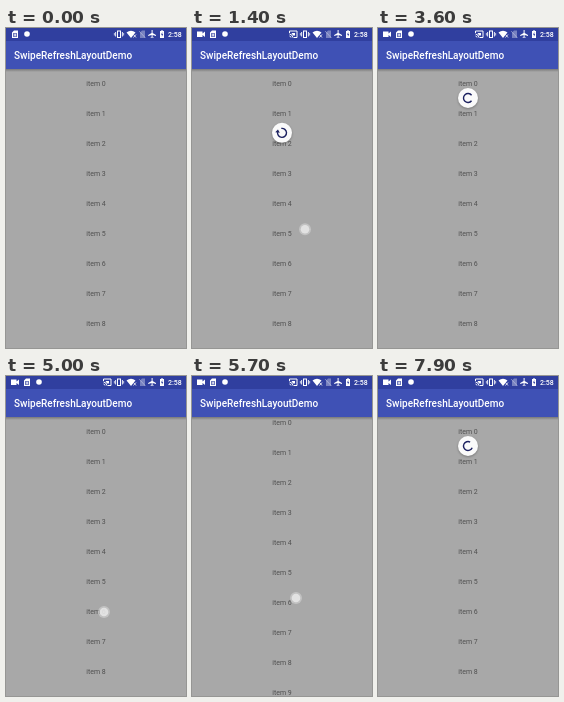
An HTML page that plays this animation: 180 px wide and 320 px high, repeating every 8 s.

```html
<!DOCTYPE html>
<html lang="en">
<head>
<meta charset="utf-8">
<title>Pull to refresh</title>
<style>
  html, body { margin: 0; width: 100%; height: 100%; overflow: hidden; background: #a8a8a8; }
  svg { display: block; width: 180px; height: 320px; }
  text { font-family: Roboto, Inter, sans-serif; }
  #list text { font-size: 7px; fill: #505050; text-anchor: middle; }
  #disc { filter: drop-shadow(0 1px 1px rgba(0, 0, 0, .28)); }
</style>
</head>
<body>
<svg viewBox="0 0 180 320">
  <defs>
    <linearGradient id="shade" x2="0" y2="1">
      <stop stop-opacity=".28"/>
      <stop offset="1" stop-opacity="0"/>
    </linearGradient>
  </defs>
  <rect width="180" height="320" fill="#a8a8a8"/>
  <g id="list"></g>
  <g id="spinner">
    <circle id="disc" r="10" fill="#fafafa"/>
    <path id="arc" fill="none" stroke-width="1.4"/>
    <path id="arrow" d="M-2.3 -.3H2.3L0 2.7Z"/>
  </g>
  <rect y="41" width="180" height="3" fill="url(#shade)"/>
  <rect y="13" width="180" height="28" fill="#3f51b5"/>
  <rect width="180" height="13" fill="#303f9f"/>
  <text x="8" y="30.5" font-size="10" font-weight="500" fill="#fff">SwipeRefreshLayoutDemo</text>

  <g fill="#fff">
    <g id="recording">
      <path d="M5 3.5h5.5v2l2.5-2v5.5l-2.500-2v2H5z"/>
      <path d="M97.500 5V3H105v6.500h-3.500M97.500 6q3 .3 3.300 3.500M97.500 8q1.300 .2 1.500 1.500" fill="none" stroke="#fff"/>
      <path d="M99.500 5h3.500v2.500h-2z"/>
    </g>
    <g id="notices">
      <path fill-rule="evenodd" d="M18 4.500l2-2h4v7.500h-6zM19.300 5v4h3.400v-4z"/>
      <rect x="20.300" y="5.500" width="1.500" height="3"/>
      <circle cx="33" cy="6" r="2.800"/>
    </g>
    <path fill-rule="evenodd" d="M111 2.500h4v7.500h-4zM112 3.500v5.500h2v-5.500zM109.200 4h.9v4.500h-.9zM115.900 4h.9v4.500h-.9zM107.900 5h.7v2.500h-.7zM117.400 5h.7v2.500h-.7z"/>
    <path d="M120.500 4.500q4.500-3.500 9 0l-4.500 5.500z"/>
    <path d="M127.500 6.500l2.500 3M130 6.500l-2.500 3" stroke="#fff" stroke-width=".8"/>
    <path d="M134 4.500l2-2h3v7.500h-5z" opacity=".35"/>
    <path d="M133 3l6.500 7" stroke="#fff" stroke-width=".7" opacity=".5"/>
    <path d="M145.600 2h1v3l3.400 2v1l-3.400-1v1.700l1 .8v.5l-1.500-.4-1.500.4v-.5l1-.8V7l-3.400 1V7l3.400-2z"/>
    <path d="M154 3h1.200v-.800h1.600V3h1.200v7h-4z"/>
    <path d="M156.300 4l-1.300 2.800h.9v2l1.300-2.800h-.9z" fill="#303f9f"/>
    <text x="162" y="9" font-size="7" font-weight="500">2:58</text>
  </g>

  <g id="touch">
    <circle r="6" fill="#d4d4d4" opacity=".6"/>
    <circle r="4.300" fill="#f0f0f0" opacity=".7"/>
  </g>
</svg>
<script>
const $ = id => document.getElementById(id);
const LOOP = 8000, REST = 40, HIDDEN_Y = 30, SWEEP = 288, CYCLE = 1332;
const NAVY = "#1c2160", GREY = "#6b6b6b";

// Finger tracks: time, x, y, opacity
const drags = [
  { release: 2110, end: 4100, origin: 110, from: 400, track: [
    [330, 124, 110, 0], [430, 124, 110, 1], [480, 124, 110, 1], [800, 122, 140, 1],
    [1300, 114, 195, 1], [2110, 106, 246, 1], [2290, 106, 246, 0]] },
  { release: 6450, end: 8450, origin: 232, from: 5800, track: [
    [4480, 98, 236, 0], [4600, 98, 236, 1], [5000, 98, 236, 1], [5400, 103, 200, 1],
    [5700, 104, 222, 1], [5800, 103, 231, 1], [6400, 93, 285, 1], [6450, 93, 290, 1], [6680, 93, 290, 0]] }
];
// Finger height at which the list is back at its top; drifts by the touch slop
const listTop = [[5000, 236], [5400, 231]];
// Pull distance to arc start angle
const turn = [[0, -20], [30, 60], [51, 215], [57, 259], [80, 261]];

const clamp = v => Math.min(1, Math.max(0, v));
const smooth = v => (v = clamp(v), v * v * (3 - 2 * v));

function at(keys, t) {
  const i = keys.findIndex(k => k[0] > t);
  if (i < 0) return keys[keys.length - 1].slice(1);
  if (!i) return keys[0].slice(1);
  const a = keys[i - 1], b = keys[i], u = (t - a[0]) / (b[0] - a[0]);
  return a.slice(1).map((v, j) => v + (b[j + 1] - v) * u);
}

// Beyond the rest position the pull meets growing tension
function pullDistance(drag) {
  if (drag <= REST) return Math.max(0, drag);
  const q = Math.min(drag - REST, 2 * REST) / REST / 4;
  return REST + 4 * REST * (q - q * q);
}

function spin(age, start) {
  const turned = 216 * Math.max(0, age) / CYCLE;
  let tail = SWEEP * smooth(age / 666), head = SWEEP;
  if (age > 666) {
    const n = Math.floor((age - 666) / CYCLE), u = (age - 666) / CYCLE - n;
    head = SWEEP * (n + 1 + smooth(u * 2));
    tail = SWEEP * (n + 1 + smooth(u * 2 - 1));
  }
  return [start + tail + turned, Math.max(12, head - tail)];
}

const polar = (deg, r = 4.5) => {
  const a = deg * Math.PI / 180;
  return [r * Math.cos(a), r * Math.sin(a)].map(v => v.toFixed(2)).join(" ");
};

function drawSpinner(t, drag) {
  const { release, end, origin, from, track } = drag;
  const pull = time => pullDistance(at(track, time)[1] - origin);
  const peak = pull(release), pulling = t < release;
  let move = pull(t), start = at(turn, move)[0], sweep = SWEEP * clamp((move / REST - .35) / .6);
  if (!pulling) {
    move = peak + (REST - peak) * (1 - (1 - clamp((t - release) / 200)) ** 4);
    [start, sweep] = spin(t - release - 200, at(turn, peak)[0]);
  }
  const size = 1 - clamp((t - end) / 150);
  const shown = t >= from && move > 0 && size > 0;
  $("spinner").style.display = shown ? "" : "none";
  if (!shown) return;
  const color = move < REST - .01 ? GREY : NAVY, tip = start + sweep;
  $("spinner").setAttribute("transform", `translate(90 ${HIDDEN_Y + move}) scale(${size})`);
  $("arc").setAttribute("d", `M${polar(start)}A4.5 4.5 0 ${sweep > 180 ? 1 : 0} 1 ${polar(tip)}`);
  $("arc").setAttribute("stroke", color);
  $("arrow").setAttribute("fill", color);
  $("arrow").setAttribute("transform", `translate(${polar(tip)}) rotate(${tip}) scale(${pulling ? clamp(move / 50) : 0})`);
}

function draw(t) {
  const drag = drags[t < 4400 ? 0 : 1];
  const [x, y, alpha] = at(drag.track, t);
  $("touch").setAttribute("transform", `translate(${x} ${y})`);
  $("touch").setAttribute("opacity", alpha);
  const scroll = t > 5000 && t < 5800 ? Math.min(0, y - at(listTop, t)[0]) : 0;
  $("list").setAttribute("transform", `translate(0 ${scroll})`);
  $("recording").style.display = t < 100 ? "none" : "";
  $("notices").setAttribute("transform", `translate(${t < 100 ? -12 : 0})`);
  drawSpinner(t, drag);
}

for (let i = 0; i < 12; i++) {
  const label = document.createElementNS("http://www.w3.org/2000/svg", "text");
  label.setAttribute("x", 90);
  label.setAttribute("y", 58 + 30 * i);
  label.textContent = "item " + i;
  $("list").append(label);
}

let begin;
function tick(now) {
  begin ??= now;
  draw((now - begin) % LOOP);
  requestAnimationFrame(tick);
}
draw(0);
requestAnimationFrame(tick);
</script>
</body>
</html>
```
